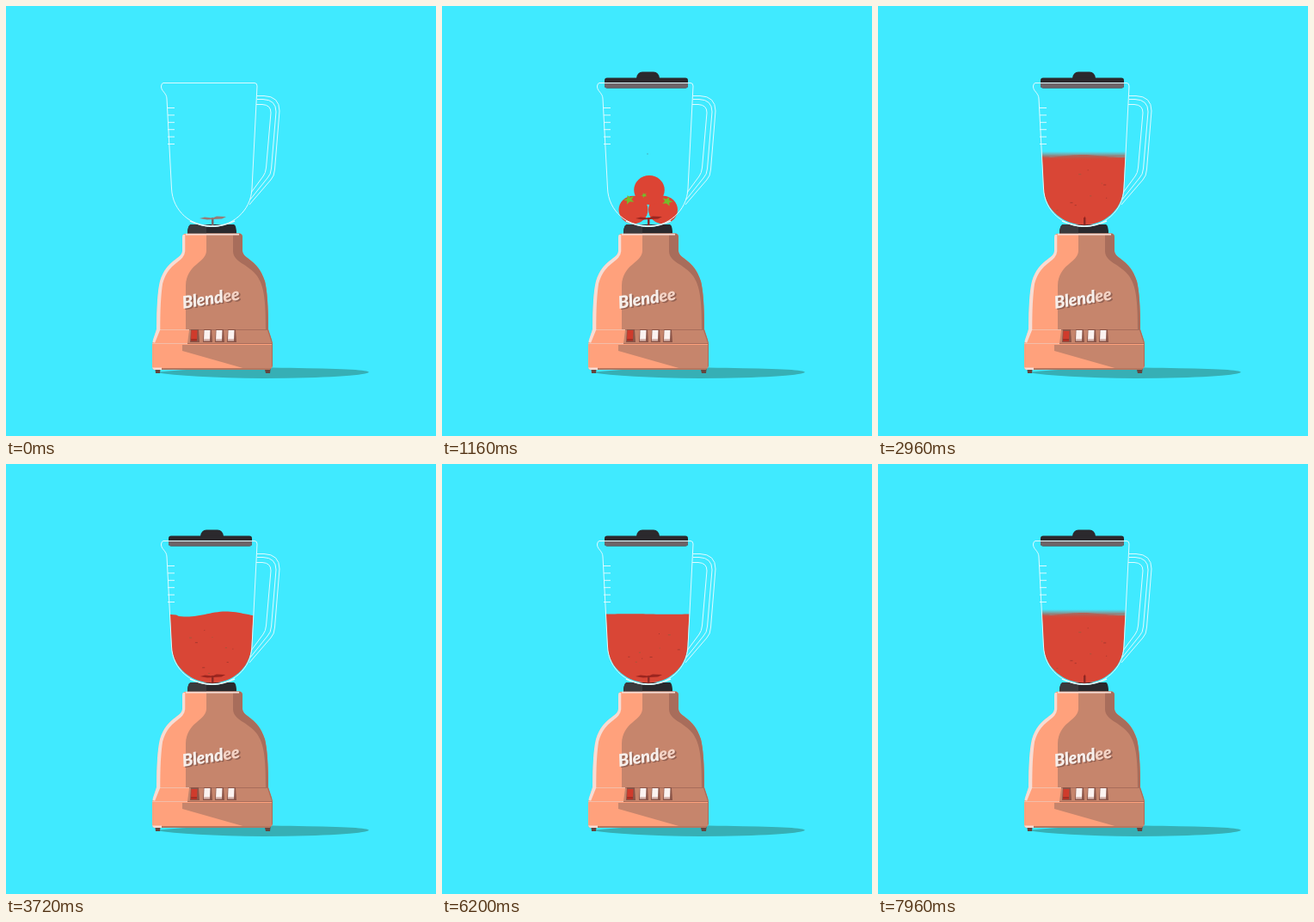
These frames come from a looping animation (500 px wide and 500 px high, 8 s). An HTML page:

```html
<!DOCTYPE html>
<html lang="en">
<head>
<meta charset="utf-8">
<title>Blender</title>
<style>
  html, body { margin: 0; width: 100%; height: 100%; overflow: hidden; background: #40eaff; }
  svg { display: block; width: 100%; height: 100%; }
  .glass { fill: none; stroke: #dffbff; stroke-width: 1; }
  .logo { font: italic 900 20px Lato, "Open Sans", sans-serif; letter-spacing: -.3px; }
</style>
</head>
<body>
<svg viewBox="0 0 500 500">
  <defs>
    <clipPath id="bowl">
      <path d="M187 100H292L285.500 212C284 238 262 254.500 240 254.500C217 254.500 194 238 192.500 212Z"/>
    </clipPath>
    <clipPath id="body">
      <path id="shell" d="M209 264.500H271Q275 264.500 275 269V285C276 295 293 294 301 320Q305 336 305 376L309 388Q310 391 310 396V418Q309 423 304 423H173Q170 423 170 419V396Q170 391 171 388L175 376Q175 336 179 320C187 294 204 295 205 285V269Q205 264.500 209 264.500Z"/>
    </clipPath>
    <linearGradient id="spray" x1="0" y1="0" x2="0" y2="1">
      <stop offset="0" stop-color="#a08078" stop-opacity="0"/>
      <stop offset=".5" stop-color="#a56b5f" stop-opacity=".85"/>
      <stop offset="1" stop-color="#d94636" stop-opacity="0"/>
    </linearGradient>
    <path id="leaf" d="M-7-2L-2-2L0-6L2-2L7-2L3 1L5 5L0 3L-5 5L-3 1Z" fill="#74bd2b"/>
  </defs>

  <!-- ground shadow and feet -->
  <path d="M174 426C230 420 300 420 340 421Q422 422 422 426Q410 432 300 433Q210 432 174 426Z" fill="#36afb5"/>
  <path d="M173 419H180L179 427H174ZM300 419H308L307 427H302Z" fill="#64463f"/>

  <!-- base -->
  <path d="M215 254H265Q268 255 268 265H211Q211 255 215 254Z" fill="#29292d"/>
  <path d="M215 254H233V265H211Q211 255 215 254Z" fill="#3b3a3d"/>
  <g clip-path="url(#body)">
    <use href="#shell" fill="#ffa17c"/>
    <path d="M233 264H280V290L310 320V377H209V325C210 300 232 299 233 285Z" fill="#c6856c"/>
    <path d="M264 264H280V290L310 320V377H302C302 340 300 326 292 314C282 300 264 298 264 285Z" fill="#a86d5b"/>
    <path d="M213 377H306L310 392H211Z" fill="#c6856c"/>
    <path d="M205 394H312V424H286L205 401Z" fill="#c6856c"/>
    <path d="M304 377L309 392V424H312V377Z" fill="#a86d5b"/>
    <path d="M172 376.500H213M170 392.500H211" stroke="#f3bda8"/>
    <path d="M213 376.500H305M211 392.500H310" stroke="#a86d5b"/>
    <path d="M206 266V285C205 297 187 296 180 322Q177 340 177 376L171 391" fill="none" stroke="#f7dcd4" stroke-width="4.500"/>
    <path d="M209 265.500H271" stroke="#f7dcd4" stroke-width="2"/>
    <path d="M170 422H310" stroke="#b47760" stroke-width="2"/>
    <path d="M170 422H181" stroke="#f7dcd4" stroke-width="3"/>
  </g>

  <g class="logo" transform="translate(206 352) rotate(-9)">
    <text x="1.500" y="1.500" fill="#946253">Blendee</text>
    <text fill="#f6eeea">Blend<tspan fill="#f3d2c4">ee</tspan></text>
  </g>

  <g id="buttons"></g>

  <!-- jar contents -->
  <g id="fruit"></g>
  <g clip-path="url(#bowl)">
    <path id="juice" fill="#d94636"/>
    <rect id="mist" x="188" y="169" width="100" height="11" fill="url(#spray)"/>
    <g id="specks"></g>
  </g>
  <path id="hub" d="M239 246H241.500V256H239Z"/>
  <path id="blade" d="M-15 0L-9-1.500L0-.5L5-2.500L16-2L11 .5L2 1L-6 1.500Z"/>
  <rect id="dot" x="238.500" y="171.500" width="1" height="1" fill="#477f87"/>

  <g id="lid">
    <path d="M226 84Q227 76.500 233 76.500H246Q252 76.500 253 84Z" fill="#2b292d"/>
    <rect x="189" y="83.500" width="97" height="12" rx="3" fill="#2b292d"/>
    <path d="M189 90H286V92Q286 95.500 283 95.500H192Q189 95.500 189 92Z" fill="#6d6468"/>
  </g>

  <!-- glass -->
  <g class="glass">
    <path d="M183 89.500H289Q292 89.500 292 93L286 212C285 239 262 256.500 240 256.500C216 256.500 193.500 239 192.500 212L187 108C187 101 180 99 180.500 93Q181 89.500 183 89.500Z"/>
    <path d="M214 250Q240 262 266 250" stroke-width="1.500"/>
    <path d="M292 104.500H300Q318 105 318 122L312.500 190Q312 198 308 202L283 231"/>
    <path d="M292 108.500H299Q314 109 314 123L308.500 189Q308 196 304 200L284 225"/>
    <path d="M291 114.500H298Q308 115 308 124L302.500 188Q302 194 299 198L285 217"/>
    <path id="ticks"/>
  </g>
</svg>

<script>
const LOOP = 8000, STEP = 40;
const $ = id => document.getElementById(id);
const clamp = v => Math.max(0, Math.min(1, v));
const progress = (t, from, to) => clamp((t - from) / (to - from));
const place = (el, x, y, extra = '') => el.setAttribute('transform', `translate(${x} ${y}) ${extra}`);

function add(parent, tag, attrs) {
  const el = document.createElementNS('http://www.w3.org/2000/svg', tag);
  for (const key in attrs) el.setAttribute(key, attrs[key]);
  return parent.appendChild(el);
}

$('ticks').setAttribute('d', Array.from({ length: 6 }, (_, i) => `M188 ${118.5 + i * 8.4}h8`).join(''));

const buttons = [214, 229, 243, 257].map((x, i) => {
  add($('buttons'), 'path', { d: `M${x + 1} 376h9l1 15h-11z`, fill: '#8b5548' });
  const cap = add($('buttons'), 'path', { d: `M${x + 1.5} 377h7l-.5 12h-7z`, fill: i ? '#fbf2f0' : '#cf3b2c' });
  add($('buttons'), 'path', { d: `M${x + 1} 387h7v2.500h-7z`, fill: i ? '#d9b9b2' : '#a52f24' });
  return cap;
});

// resting place, radius, fall start and end, leaf offset and size
const fruit = [
  { x: 222.5, y: 237, r: 17, from: 440, to: 760, leaf: [-5, -12, .9] },
  { x: 257, y: 237, r: 17, from: 540, to: 880, leaf: [5, -10, .9] },
  { x: 241, y: 214, r: 17.8, from: 640, to: 1000, leaf: [-6, 6, .5] }
].map(f => {
  const el = add($('fruit'), 'g', {});
  add(el, 'ellipse', { rx: f.r, ry: f.r - .8, fill: '#dc4434' });
  const [x, y, size] = f.leaf;
  place(add(el, 'use', { href: '#leaf' }), x, y, `rotate(${x * 4}) scale(${size})`);
  return { ...f, el };
});

const specks = Array.from({ length: 9 }, (_, i) =>
  add($('specks'), 'rect', { width: 1 + i % 3, height: 1, fill: i % 2 ? '#a8553a' : '#a8382d' }));

// one spin takes five steps
const bladeWidth = [1, .4, -.5, .95, .06];
const waveHeight = [.3, 2, 4, 3, 1.5];

function drawJuice(t, beat) {
  const level = t < 2680 ? 256 - 74 * progress(t, 2360, 2640) : 174.5;
  const height = waveHeight[beat];
  let d = 'M186 260';
  for (let x = 186; x <= 292; x += 3) {
    const swell = Math.sin((x - 233) / 46 * Math.PI + (beat - 3) * 1.25);
    d += `L${x} ${level - height * swell * (x < 200 ? .5 : 1)}`;
  }
  $('juice').setAttribute('d', d + 'V260Z');
  $('juice').style.display = t > 2360 ? '' : 'none';
  $('mist').style.display = t >= 2680 && beat === 4 ? '' : 'none';
  specks.forEach((el, i) => {
    const angle = i * 2.4 + beat * Math.PI * .4;
    place(el, 240 + (12 + i * 3) * Math.cos(angle), 217 + (i * 17 % 40 - 20) + 7 * Math.sin(angle));
  });
  $('specks').style.display = t >= 2640 ? '' : 'none';
}

function drawFruit(t, beat) {
  const spinning = t >= 1840;
  const melt = progress(t, 2360, 2640);
  fruit.forEach((f, i) => {
    const fall = progress(t, f.from, f.to);
    const bounce = 4 * Math.sin(Math.PI * progress(t, f.to, f.to + 140));
    const shake = spinning ? Math.sin(beat * Math.PI * .4 + i) : 0;
    const y = -20 + (f.y + 20) * fall * fall - bounce + melt * 12;
    place(f.el, f.x + shake, y, `rotate(${(1 - fall) * 90 + shake * 4}) scale(${1 - melt * .6})`);
  });
  $('fruit').style.display = t >= 440 && t < 2640 ? '' : 'none';
}

function draw(time) {
  const t = Math.floor(time % LOOP / STEP) * STEP;
  const beat = t / STEP % 5;
  const drop = progress(t, 880, 1120);
  drawFruit(t, beat);
  drawJuice(t, beat);
  place($('lid'), 0, -100 * (1 - drop * drop));
  place($('blade'), 240, 247, `scale(${t >= 1840 ? bladeWidth[beat] : 1} 1)`);
  $('blade').setAttribute('fill', t < 760 ? '#957c78' : '#9b251f');
  $('hub').setAttribute('fill', t < 760 ? '#77686a' : '#8c2a26');
  $('dot').style.display = t >= 1160 && t < 2640 ? '' : 'none';
  place(buttons[0], 0, t >= 1840 ? 1 : 0);
}

const start = performance.now();
function tick() {
  draw(performance.now() - start);
  requestAnimationFrame(tick);
}
tick();
</script>
</body>
</html>
```
